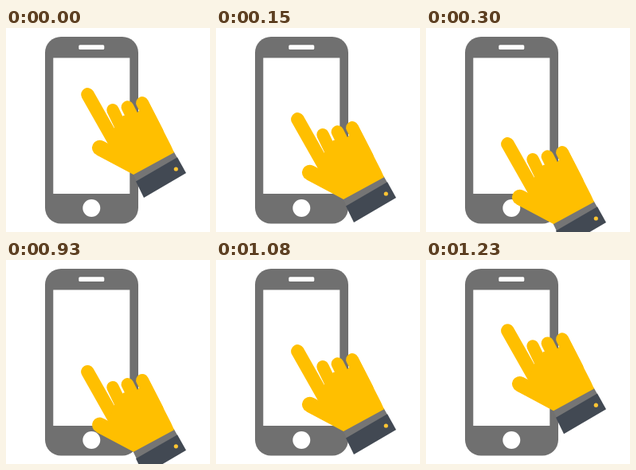
Write an HTML page that moves like this. It is 256 px wide and 256 px high and loops after 1260 ms.

```html
<!DOCTYPE html>
<html lang="en">
<head>
<meta charset="utf-8">
<title>Swipe down</title>
<style>
  html, body { margin: 0; width: 100%; height: 100%; overflow: hidden; background: #fff; }
  svg { display: block; width: 100%; height: 100%; }
  .fingers { stroke: #ffbf00; stroke-linecap: round; fill: none; }
</style>
</head>
<body>
<svg viewBox="0 0 256 256">
  <g fill="#fff">
    <rect x="49" y="11" width="117" height="234.5" rx="20" fill="#707070"/>
    <rect x="59.3" y="37.5" width="96" height="170.5"/>
    <rect x="91.3" y="21.3" width="32" height="5.6" rx="1.5"/>
    <circle cx="107.3" cy="226" r="11"/>
  </g>
  <g id="hand">
    <path d="M159.5 183.5 210.5 155 215 163 164 193Z" fill="#757575"/>
    <path d="M163 192.5 215 162.3 226 182 173 213Z" fill="#424953"/>
    <circle cx="213.3" cy="177" r="2.6" fill="#ffc533"/>
    <g class="fingers">
      <path d="M102.4 83.4 135 141" stroke-width="16.6"/>
      <path d="M134 102.8 148 132" stroke-width="15.4"/>
      <path d="M152.5 99.2 166 126" stroke-width="15.8"/>
      <path d="M171 94 190 131" stroke-width="15.8"/>
      <path d="M117.5 150.3 144 164" stroke-width="19"/>
    </g>
    <path d="M136 125 147 110 165 106 178 90.8 207 147.5Q209 152 211 156.3L160 184 113.5 159.2 122 142 129 146Z" fill="#ffbf00"/>
  </g>
</svg>
<script>
  const LOOP = 1260, STEP = 30, TRAVEL = 62;
  const DOWN_END = 300, UP_START = 900;
  const hand = document.getElementById('hand');

  function offsetAt(ms) {
    const t = Math.floor(ms / STEP) * STEP;
    if (t < DOWN_END) return TRAVEL * t / DOWN_END;
    if (t < UP_START) return TRAVEL;
    return TRAVEL * (LOOP - t) / (LOOP - UP_START);
  }

  let start;
  function draw(now) {
    start ??= now;
    hand.setAttribute('transform', `translate(0 ${offsetAt((now - start) % LOOP)})`);
    requestAnimationFrame(draw);
  }
  requestAnimationFrame(draw);
</script>
</body>
</html>
```
